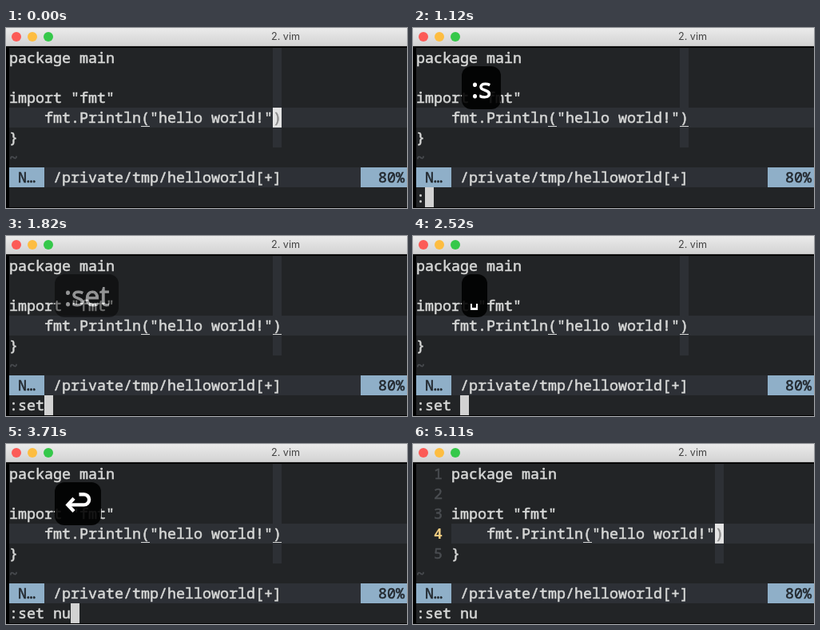
Write an HTML page that moves like this. It is 502 px wide and 226 px high and loops after 5180 ms.

```html
<!DOCTYPE html>
<html lang="en">
<head>
<meta charset="utf-8">
<title>vim: set nu</title>
<style>
  html, body { margin: 0; width: 502px; height: 226px; overflow: hidden; background: #000; }
  body { position: relative; }
  div { position: absolute; }
  #bar {
    left: 0; top: 0; width: 502px; height: 23px; box-sizing: border-box;
    background: linear-gradient(#ebebeb, #d3d3d3); border-bottom: 1px solid #b4b4b4;
  }
  #bar i { position: absolute; top: 5px; width: 12px; height: 12px; border-radius: 50%; }
  #title {
    left: 332px; top: 0; white-space: pre;
    font: 12.6px/22px Inter, Roboto, sans-serif; color: #444;
  }
  #term {
    left: 4px; top: 25px; width: 498px; height: 200px; overflow: hidden;
    background: #222426; color: #d6d7d6;
    font: 18.333px/23px "Noto Sans Mono", "DejaVu Sans Mono", monospace;
    font-variant-ligatures: none; -webkit-text-stroke: .55px;
  }
  #term div { white-space: pre; height: 25px; }
  #code { left: 0; top: 0; width: 498px; }
  #code .line, #column { background: #2d3035; }
  #code .line { left: 0; top: 75px; width: 498px; }
  #term #column { left: 330px; top: 0; width: 11px; height: 125px; }
  .pair { display: inline-block; height: 24px; box-shadow: inset 0 -1px #d6d7d6; }
  .pair.on { height: 25px; vertical-align: top; background: #e4e4e4; color: #8e8e8e; }
  .num, .tilde { color: #4a4d51; }
  .num.now { color: #f0cb80; font-weight: 700; -webkit-text-stroke: 0; }
  #status { left: 0; top: 150px; width: 498px; background: #2d3036; }
  .mode { top: 150px; background: #8fafc8; color: #22282e; }
  #cursor { top: 175px; width: 11px; background: #d2d2d2; }
  #keys {
    left: 61px; top: 48px; height: 54px; padding: 0 12px; border-radius: 12px;
    background: rgba(0, 0, 0, .9); color: #fff; white-space: pre;
    font: 34px/54px "Open Sans", "Noto Sans", sans-serif; -webkit-text-stroke: 1px;
  }
  #keys b {
    display: inline-block; width: 5px; height: 5px; margin: 0 0 -5px -1px;
    border: solid #fff; border-width: 0 2.5px 3px;
  }
  #keys svg { display: block; width: 34px; height: 54px; fill: none; stroke: #fff; stroke-width: 4.4; }
</style>
</head>
<body>
<div id="bar">
  <i style="left:7px;background:#fc5b57"></i>
  <i style="left:27px;background:#fdbd41"></i>
  <i style="left:47px;background:#35c84a"></i>
  <div id="title">2. vim</div>
</div>
<div id="term">
  <div id="code"><div id="column"></div><div class="line"></div></div>
  <div id="nums"></div>
  <div class="tilde" style="top:125px">~</div>
  <div id="status">     /private/tmp/helloworld[+]</div>
  <div class="mode" style="left:0;width:44px"> N…</div>
  <div class="mode" style="left:440px;width:58px">  80%</div>
  <div id="cmd" style="top:175px"></div>
  <div id="cursor"></div>
</div>
<div id="keys"></div>
<script>
const LOOP = 5180, STEP = 70, CELL = 11, ROW = 25;
const $ = id => document.getElementById(id);

const addRow = (parent, row, html, cls = '') =>
  parent.insertAdjacentHTML('beforeend', `<div class="${cls}" style="top:${row * ROW}px">${html}</div>`);

const lines = [
  'package main',
  '',
  'import "fmt"',
  '    fmt.Println<span class="pair">(</span>"hello world!"<span class="pair" id="close">)</span>',
  '}'
];
lines.forEach((line, i) => {
  addRow($('code'), i, line);
  addRow($('nums'), i, `  ${i + 1}`, i === 3 ? 'num now' : 'num');
});

const space = '<b></b>';
const enter = '<svg viewBox="73 48 34 54"><path d="M91.5 63.2H97.5a6.6 6.6 0 0 1 0 13.2H79"/><path d="M85 68.2L77.4 76.4L85 84.6"/></svg>';

// [time, command line]
const typed = [
  [0, ''], [910, ':'], [1190, ':s'], [1260, ':se'], [1330, ':set'],
  [2520, ':set '], [2660, ':set n'], [2800, ':set nu']
];
// [time, overlay, fade start]
const pressed = [
  [0, '', 0],
  [910, ':', 1730], [1120, ':s', 1730], [1190, ':se', 1730], [1260, ':set', 1730],
  [2520, space, 2940], [2660, space + 'n', 2940], [2730, space + 'nu', 2940],
  [3570, enter, 4130]
];
const FADE = 420, NUMBERED = 3780, BLINK = [2310, 2520];

const latest = (table, t) => table.filter(r => r[0] <= t).pop();
const fade = p => (1 - Math.max(0, Math.min(1, p))) ** 2.8;
let shown = '';

function draw(t) {
  const numbered = t >= NUMBERED;
  const [, text] = latest(typed, t);
  const [, keys, fadeStart] = latest(pressed, t);
  const inCommand = text !== '' && !numbered;
  const blinkOff = t >= BLINK[0] && t < BLINK[1];

  $('code').style.left = (numbered ? 4 * CELL : 0) + 'px';
  $('nums').style.visibility = numbered ? 'visible' : 'hidden';
  $('close').classList.toggle('on', !inCommand);
  $('cmd').textContent = text;
  $('cursor').style.left = text.length * CELL + 'px';
  $('cursor').style.visibility = inCommand && !blinkOff ? 'visible' : 'hidden';

  if (keys !== shown) $('keys').innerHTML = shown = keys;
  $('keys').style.opacity = keys ? fade((t - fadeStart) / FADE) : 0;
}

const start = performance.now();
function tick() {
  const t = (performance.now() - start) % LOOP;
  draw(Math.floor(t / STEP) * STEP);
  requestAnimationFrame(tick);
}
tick();
</script>
</body>
</html>
```
